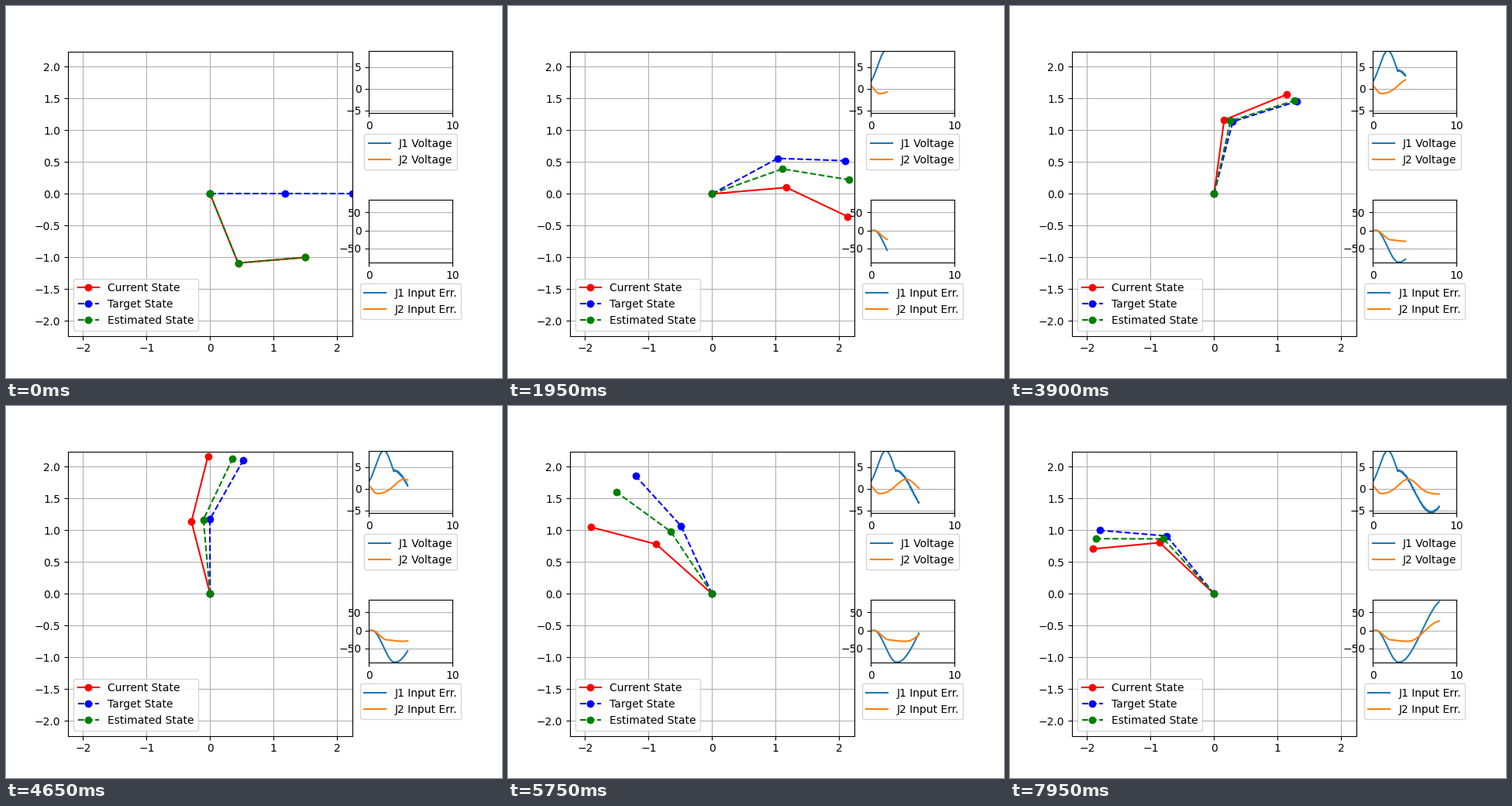
A matplotlib script that plays this animation: 640x480 px, repeating every 8 s.

```python
import numpy as np
import matplotlib.pyplot as plt
from matplotlib.animation import FuncAnimation

FRAMES, STEP = 160, 0.05
L1, L2 = 1.1748, 1.0617
REACH = L1 + L2


def ease(s):
    s = np.clip(s, 0, 1)
    return s * s * (3 - 2 * s)


def bump(t, height, peak, left, right):
    """Bell curve with its own width on each side."""
    width = np.where(t < peak, left, right)
    return height * np.exp(-((t - peak) / width) ** 2)


def inverse(x, y, bend):
    """Absolute link angles that put the tip at (x, y)."""
    d = np.hypot(x, y)
    inner = np.arccos((L1 * L1 + d * d - L2 * L2) / (2 * L1 * d))
    a = np.arctan2(y, x) + bend * inner
    return np.array([a, np.arctan2(y - L1 * np.sin(a), x - L1 * np.cos(a))])


def chain(angles):
    a, b = angles
    x, y = L1 * np.cos(a), L1 * np.sin(a)
    return [0, x, x + L2 * np.cos(b)], [0, y, y + L2 * np.sin(b)]


low, high, left = inverse(1.5, -1, -1), inverse(1.5, 1, 1), inverse(-1.8, 1, -1)


def target(t):
    t -= 0.02
    return low + (high - low) * ease(t / 3) + (left - high) * ease((t - 3) / 4)


# Each link lags in both swings: (degrees, peak time, rise, fall)
CURRENT = (((-28, 1.45, 1.0, 1.25), (24.7, 6.15, 2.04, 1.65)),
           ((-30, 1.26, 1.1, 1.39), (35, 6.15, 1.65, 1.62)))
ESTIMATE = (((-10, 1.46, 1.0, 1.5), (9.6, 6.3, 2.08, 1.62)),
            ((-9, 1.14, 1.0, 1.73), (13.2, 6.25, 1.46, 1.66)))


def lag(links, t):
    return np.radians([sum(bump(t, *b) for b in link) for link in links]) * np.tanh(3 * t)


# Histories shown in the side plots
time = np.arange(0, 8.001, 0.01)
jitter = np.repeat(np.random.default_rng(4).uniform(-0.12, 0.12, 401), 2)[:time.size]
volt1 = np.where(time <= 3, bump(time, 8.8, 1.8, 1.38, 1.35),
                 -0.6 + 4.8 * np.cos(np.pi * (time - 3) / 4) + jitter)
volt2 = bump(time, 1.85, 0, 0.55, 0.55) + bump(time, 3.45, 4.25, 1.65, 1.59) - 1.25
err1 = -87.5 * ease((time - 0.4) / 2.65) + 174 * ease((time - 3.2) / 5.4)
err2 = (-25 * ease((time - 0.4) / 1.7) - 5 * ease((time - 1.5) / 2.5)
        + 56 * ease((time - 4.3) / 3.8))

fig = plt.figure(figsize=(6.4, 4.8), dpi=100)
grid = fig.add_gridspec(4, 4)

arm = fig.add_subplot(grid[:, :3])
arm.set(xlim=(-REACH, REACH), ylim=(-REACH, REACH), aspect="equal",
        xticks=np.arange(-2, 3), yticks=np.arange(-2, 2.1, 0.5))
arm.grid(True)
arms = [arm.plot([], [], style, label=name + " State")[0]
        for style, name in (("r-o", "Current"), ("b--o", "Target"), ("g--o", "Estimated"))]
arm.legend(loc="lower left")


def side_plot(row, limits, gap, label):
    ax = fig.add_subplot(grid[row, 3])
    ax.set(xlim=(0, 10.02), ylim=limits, xticks=[0, 10], yticks=[-gap, 0, gap])
    ax.grid(True)
    lines = [ax.plot([], [], label=f"J{j} {label}")[0] for j in (1, 2)]
    ax.legend(loc="upper center", bbox_to_anchor=(0.5, -0.255))
    return lines


traces = (side_plot(0, (-5.6, 8.8), 5, "Voltage")
          + side_plot(2, (-88.3, 84), 50, "Input Err."))


def update(i):
    t = i * STEP
    goal = target(t)
    shown = goal if i else np.zeros(2)
    for line, pose in zip(arms, (goal + lag(CURRENT, t), shown, goal + lag(ESTIMATE, t))):
        line.set_data(*chain(pose))
    n = 5 * i + 1 if i else 0
    for line, values in zip(traces, (volt1, volt2, err1, err2)):
        line.set_data(time[:n], values[:n])
    return arms + traces


anim = FuncAnimation(fig, update, frames=FRAMES, interval=50, repeat=True, repeat_delay=0)
plt.show()
```
